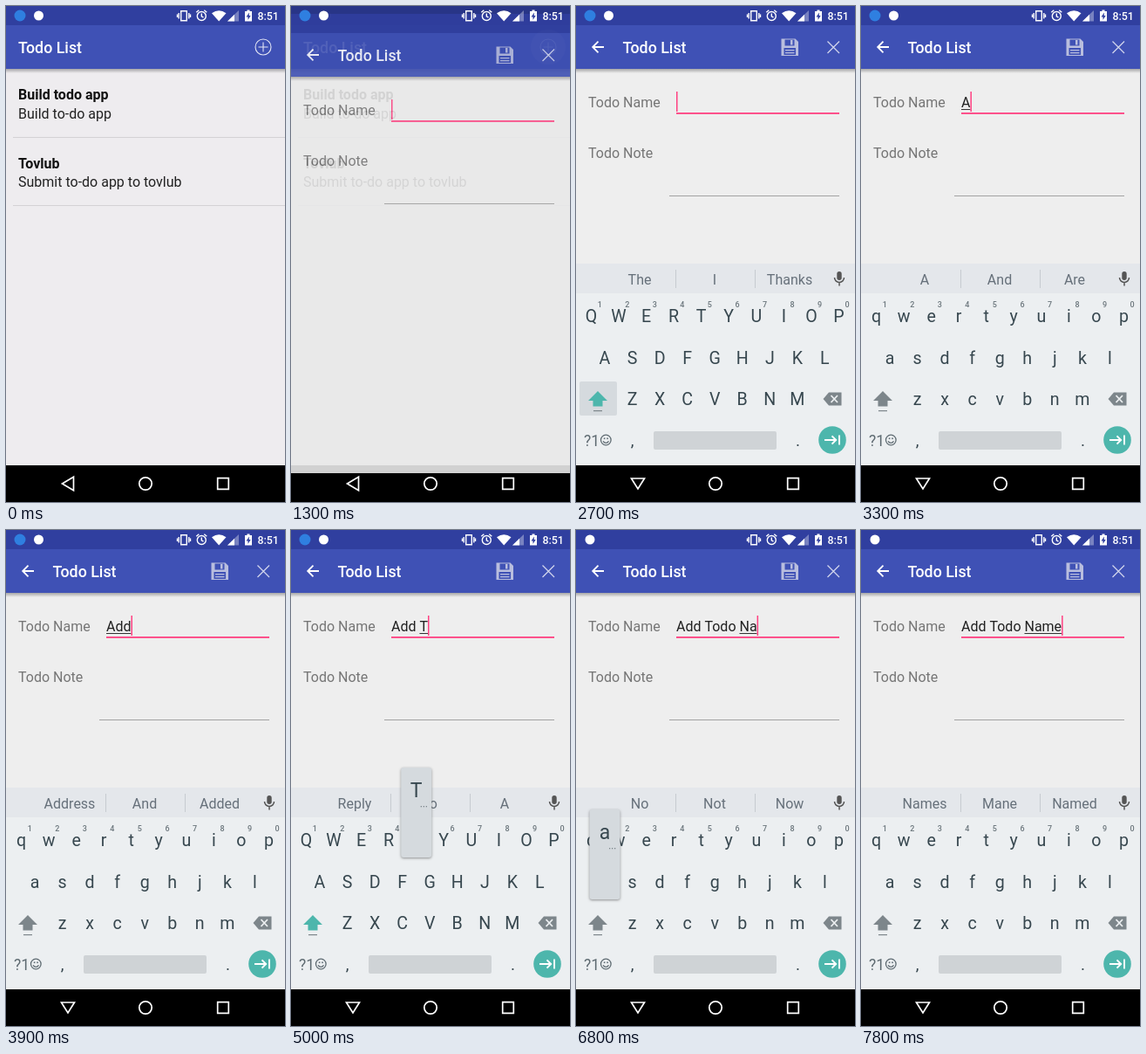
An HTML page with a canvas that plays this animation: 320 by 568 pixels, repeating every 8000 ms.

```html
<!DOCTYPE html>
<html lang="en">
<head>
<meta charset="utf-8">
<title>Todo List</title>
<style>
html, body { margin: 0; width: 320px; height: 568px; overflow: hidden; background: #000; }
canvas { display: block; }
</style>
</head>
<body>
<canvas id="stage" width="320" height="568"></canvas>
<script>
const W = 320, H = 568, LOOP = 8000, STEP = 100;
const NAV_Y = 526, KEYS_Y = 295;
const INDIGO = '#3f51b5', DARK = '#303f9f', PINK = '#ff4081', TEAL = '#4db6ac';
const INK = '#37474f', GRAY = '#7d868b', WHITE = '#fff';
const ROWS = [['qwertyuiop', 17.5, 355], ['asdfghjkl', 33, 403], ['zxcvbnm', 64.5, 450]];
const PITCH = 31.55;

// Each entry changes part of the editor state from its time on
const script = [
  [1300, { text: '', word: '', caps: false, press: '', hints: 'the|I|thanks' }],
  [2700, { caps: true, press: 'shift', hints: 'The|I|Thanks' }],
  [2800, { press: '' }],
  [3100, { press: 'A' }],
  [3200, { word: 'A' }],
  [3300, { press: '', caps: false, hints: 'A|And|Are' }],
  [3400, { press: 'd' }],
  [3500, { word: 'Ad' }],
  [3600, { press: '', hints: 'Ad|And|As' }],
  [3700, { press: 'd' }],
  [3800, { word: 'Add' }],
  [3900, { press: '', hints: 'Address|And|Added' }],
  [4000, { press: 'space' }],
  [4100, { press: '', text: 'Add ', word: '', hints: 'reply|to|a' }],
  [4500, { caps: true, press: 'shift', hints: 'Reply|To|A' }],
  [4600, { press: '' }],
  [5000, { press: 'T', word: 'T' }],
  [5100, { press: '', caps: false, hints: 'The|To|Thanks' }],
  [5200, { press: 'o', word: 'To' }],
  [5300, { press: '', hints: 'To|Too|Top' }],
  [5400, { press: 'd', word: 'Tod' }],
  [5500, { press: '', hints: 'Today|Told|Too' }],
  [5600, { press: 'o', word: 'Todo' }],
  [5700, { press: '', hints: 'To do|To-do|Too' }],
  [6100, { press: 'space' }],
  [6200, { press: '', text: 'Add Todo ', word: '', hints: 'list|the|and' }],
  [6400, { caps: true, press: 'shift', hints: 'List|The|And' }],
  [6500, { press: '' }],
  [6600, { press: 'N', word: 'N' }],
  [6700, { press: '', caps: false, hints: 'No|Not|Now' }],
  [6800, { press: 'a', word: 'Na' }],
  [6900, { press: '', hints: 'Name|Nap|Nah' }],
  [7000, { press: 'm', word: 'Nam' }],
  [7100, { press: '', hints: 'Name|Names|Man' }],
  [7500, { press: 'e' }],
  [7600, { word: 'Name' }],
  [7700, { press: '' }],
  [7800, { hints: 'Names|Mane|Named' }]
];

const screen = document.getElementById('stage').getContext('2d');
const spare = new OffscreenCanvas(W, H).getContext('2d');
let g = screen;

function rect(x, y, w, h, color) {
  g.fillStyle = color;
  g.fillRect(x, y, w, h);
}
function fill(path, color) {
  g.fillStyle = color;
  g.fill(new Path2D(path));
}
function stroke(path, color, width) {
  g.strokeStyle = color;
  g.lineWidth = width;
  g.stroke(new Path2D(path));
}
const circle = (x, y, r) => `M${x - r} ${y}a${r} ${r} 0 1 1 ${2 * r} 0a${r} ${r} 0 1 1 ${-2 * r} 0z`;
function box(x, y, w, h, r, color) {
  g.fillStyle = color;
  g.beginPath();
  g.roundRect(x, y, w, h, r);
  g.fill();
}
function label(s, x, y, size, color, weight = 400, align = 'left') {
  g.font = `${weight} ${size}px Roboto, sans-serif`;
  g.fillStyle = color;
  g.textAlign = align;
  g.fillText(s, x, y);
  return g.measureText(s).width;
}
// Paints a group off screen, then blends it as one sheet
function layer(alpha, dy, paint) {
  g = spare;
  g.clearRect(0, 0, W, H);
  paint();
  g = screen;
  g.globalAlpha = alpha;
  g.drawImage(spare.canvas, 0, dy);
  g.globalAlpha = 1;
}

function appBar(titleX, background) {
  rect(0, 0, W, NAV_Y, background);
  rect(0, 0, W, 22, DARK);
  rect(0, 22, W, 50, INDIGO);
  const shade = g.createLinearGradient(0, 72, 0, 77);
  shade.addColorStop(0, 'rgba(0,0,0,.3)');
  shade.addColorStop(1, 'rgba(0,0,0,0)');
  rect(0, 72, W, 5, shade);
  label('Todo List', titleX, 54, 17.8, WHITE, 500);
}

function listPage(t) {
  appBar(14, '#eeecef');
  if (t >= 800) fill(circle(295, 47, Math.min(20, 8 + (t - 800) * .04)), 'rgba(255,255,255,.16)');
  stroke(circle(295, 47, 9) + 'M289.5 47h11M295 41.5v11', '#e4e6f4', 1.1);
  const items = [['Build todo app', 'Build to-do app'], ['Tovlub', 'Submit to-do app to tovlub']];
  items.forEach(([name, note], i) => {
    const y = i * 78.5;
    label(name, 14, 107 + y, 16, '#111', 700);
    label(note, 14, 128.5 + y, 16, '#222');
    rect(8, Math.floor(150 + y), 312, 1, '#d4d2d5');
  });
}

function editPage(t, s) {
  appBar(53.5, '#eeeeee');
  stroke('M32 47H19.5M25.5 40.7L19.2 47L25.5 53.3', WHITE, 1.8);
  const metal = '#b9bede';
  fill('M235.5 37.5h16l3.5 3.5v16h-19.5z', metal);
  rect(239.5, 38.5, 11, 7, INDIGO);
  rect(246, 39, 2.5, 5.5, metal);
  rect(238.5, 48, 13.5, 8, INDIGO);
  rect(240, 50, 10.5, 1.3, metal);
  rect(240, 53, 10.5, 1.3, metal);
  stroke('M288.5 40.5l13.5 13.5m0-13.5l-13.5 13.5', '#d0d4ec', 1.3);

  label('Todo Name', 14, 116, 16, '#757575');
  label('Todo Note', 14, 174, 16, '#757575');
  rect(115, 122, 187, 1.8, PINK);
  rect(107, 217, 195, 1, '#a2a2a2');

  const start = 115 + label(s.text, 115, 116, 16, '#212121');
  const width = label(s.word, start, 116, 16, '#212121');
  rect(start, 118, width, 1, '#333');
  if (Math.floor((t - s.typedAt) / 500) % 2 === 0) rect(start + width, 98, 1.5, 23, PINK);
}

function popup(key, x, y) {
  g.shadowColor = 'rgba(0,0,0,.4)';
  g.shadowBlur = 3;
  g.shadowOffsetY = 1;
  box(x - 17.5, y - 83, 35, 103, 3, '#d5dade');
  g.shadowColor = 'transparent';
  label(key, x, y - 49, 23, INK, 400, 'center');
  if (!'dm'.includes(key)) [5, 8, 11].forEach(dx => rect(x + dx, y - 39, 1.3, 1.3, GRAY));
}

function keyboard(s) {
  rect(0, KEYS_Y, W, 34, '#e4e7eb');
  rect(0, 329, W, NAV_Y - 329, '#eceff1');
  s.hints.split('|').forEach((hint, i) => label(hint, 73 + 86 * i, 318.5, 16, '#66707a', 400, 'center'));
  rect(114, 302, 1, 21, '#c6cbd0');
  rect(205, 302, 1, 21, '#c6cbd0');
  box(299.3, 304, 5.4, 10, 2.7, '#555');
  stroke('M296.5 311a5.5 5.5 0 0 0 11 0M302 316.5v4', '#555', 1.5);

  let bubble;
  ROWS.forEach(([keys, x0, y]) => [...keys].forEach((k, i) => {
    const x = x0 + PITCH * i, key = s.caps ? k.toUpperCase() : k;
    if (k === s.press.toLowerCase()) bubble = [s.press, x, y];
    label(key, x, y + 7, 19.6, INK, 400, 'center');
    if (y === 355) label((i + 1) % 10, x + 9.7, 345, 9, '#6b767c', 500, 'center');
  }));

  if (s.press === 'shift') box(4, 430, 43, 39, 2, '#d5dade');
  fill('M25 441l11 11h-5.5v6.5h-11V452H14z', s.caps ? TEAL : GRAY);
  rect(20, 463, 10, 1.2, GRAY);
  fill('M290 442.5h14.5v15H290l-6.5-7.5z', GRAY);
  stroke('M292.5 446l7.5 8m0-8l-7.5 8', '#eceff1', 1.8);

  label('?1', 9, 503.5, 17.5, '#5f6b72');
  stroke(circle(34.3, 497, 5.8) + 'M31.2 498.3a3.3 3.3 0 0 0 6.2 0', '#5f6b72', 1.3);
  rect(31.8, 494.5, 1.6, 1.6, '#5f6b72');
  rect(35.3, 494.5, 1.6, 1.6, '#5f6b72');
  label(',', 64.5, 503.5, 19, INK, 400, 'center');
  label('.', 254.5, 503.5, 19, INK, 400, 'center');
  box(89, 487, 141, 21, 2, s.press === 'space' ? '#babec1' : '#cfd3d6');
  fill(circle(294, 497, 15.8), TEAL);
  stroke('M285 497h13M293.5 492.3l4.7 4.7l-4.7 4.7M302 491.5v11', WHITE, 1.9);
  if (bubble) popup(...bubble);
}

function statusIcons(t) {
  const moved = t >= 5300;
  if (!moved) fill(circle(16, 11, 6.5), '#2f7fe0');
  fill(circle(moved ? 16 : 37.5, 11, 5.5), WHITE);
  stroke('M200.7 5.7h6.6v11.1h-6.6zM198.2 8v6.5M196.5 9.5v3.5M209.8 8v6.5M211.5 9.5v3.5', WHITE, 1.4);
  stroke(circle(224.3, 11.5, 5) + 'M224.3 8.5v3.3l2.2 1.4M218.3 7.3l3-2.6M230.3 7.3l-3-2.6', WHITE, 1.4);
  fill('M236 8.3Q244.2 2 252.5 8.3L244.2 17.5z', WHITE);
  fill('M267 5v12.5h-13z', 'rgba(255,255,255,.35)');
  fill('M254 17.5h8V9.8z', WHITE);
  fill('M274 6h2.5V4.5h3V6h2.5v11.5h-8z', WHITE);
  fill('M279 7.5l-3.5 5h2v3.5l3.2-5h-2z', DARK);
  label('8:51', 288.5, 16, 12.4, WHITE, 500);
}

function navIcons(keysUp) {
  stroke(keysUp ? 'M63.5 541h15L71 553z' : 'M64.5 547L77.5 539.3v15.4z', WHITE, 1.7);
  stroke(circle(160, 547, 7.2) + 'M242.7 540.7h12.6v12.6h-12.6z', WHITE, 1.7);
}

function stateAt(t) {
  const s = { ...script[0][1], typedAt: 1300 };
  for (const [at, change] of script) {
    if (at > t) break;
    Object.assign(s, change);
    if ('word' in change) s.typedAt = at;
  }
  return s;
}

function draw(t) {
  const s = stateAt(t);
  const open = Math.min(1, Math.max(0, (t - 1100) / 400));
  const rise = Math.min(1, Math.max(0, (t - 1600) / 400));
  rect(0, 0, W, H, '#000');
  if (open < 1) layer(1 - .3 * open, 0, () => listPage(t));
  if (open > 0) layer(Math.min(1, open * 1.76), Math.round(45 * (1 - open) ** 2.3), () => editPage(Math.max(t, 1300), s));
  if (rise > 0) layer(Math.min(1, rise * 1.5), Math.round(46 * (1 - rise) ** 2), () => keyboard(s));
  if (open === 1) rect(0, NAV_Y, W, H - NAV_Y, '#000');
  statusIcons(t);
  navIcons(rise > 0);
}

function tick() {
  const t = performance.now() % LOOP;
  draw(Math.floor(t / STEP) * STEP);
  requestAnimationFrame(tick);
}
tick();
</script>
</body>
</html>
```
